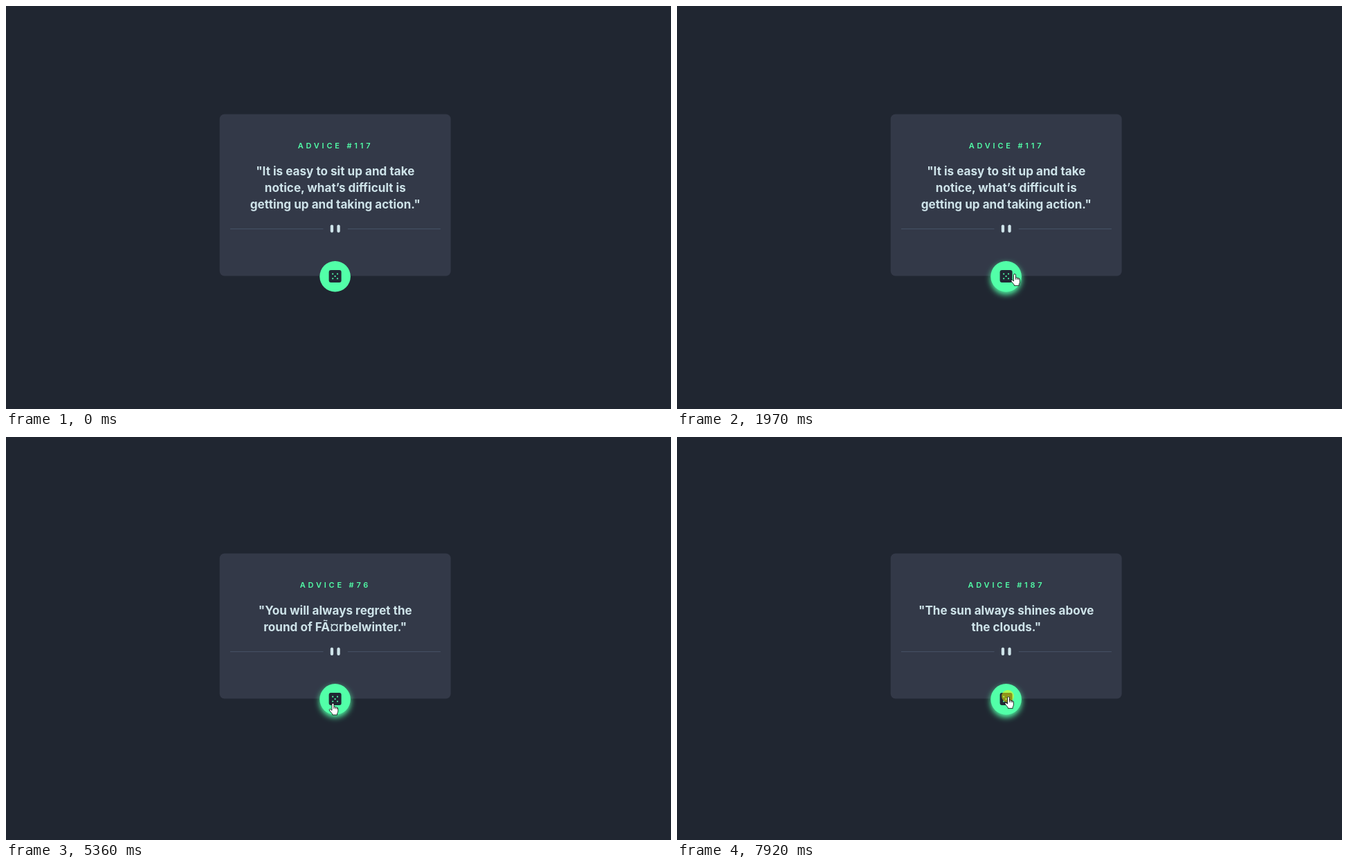
Recreate the animation shown at these times as an HTML page. Size 961 px wide and 583 px high, loop 8 s.

```html
<!DOCTYPE html>
<html lang="en">
<head>
<meta charset="utf-8">
<title>Advice card</title>
<style>
  html, body { margin: 0; width: 100%; height: 100%; overflow: hidden; background: #202631; }
  svg { display: block; width: 961px; height: 583px; }
  text { font-family: Inter, sans-serif; text-anchor: middle; }
  #title { font-size: 11px; font-weight: 600; letter-spacing: 3.8px; fill: #52ffa8; }
  .quote { font-size: 17.1px; font-weight: 680; fill: #cee3e9; }
</style>
</head>
<body>
<svg viewBox="0 0 961 583">
  <defs>
    <filter id="blur" x="-50%" y="-50%" width="200%" height="200%"><feGaussianBlur stdDeviation="4"/></filter>
  </defs>
  <rect width="961" height="583" fill="#202631"/>
  <rect id="card" x="308.7" width="334" rx="7" fill="#333948"/>
  <text id="title" x="476"/>
  <text class="quote" x="475.8"/>
  <text class="quote" x="475.8"/>
  <text class="quote" x="475.8"/>
  <g id="divider">
    <path d="M324 .4H458.5M493.8 .4H628" stroke="#4f5d74" stroke-width=".7"/>
    <g fill="#cee3e9">
      <rect x="468.8" y="-5.6" width="4.3" height="11.4" rx="2.1"/>
      <rect x="478.4" y="-5.6" width="4.3" height="11.4" rx="2.1"/>
    </g>
  </g>
  <g id="button">
    <circle id="glow" cy="3.7" r="22.3" fill="#52ffa8" filter="url(#blur)"/>
    <circle r="22.3" fill="#52ffa8"/>
    <rect x="-9" y="-9.3" width="18" height="18" rx="3" fill="#202733"/>
    <g id="pips" fill="#52ffa8"></g>
  </g>
  <g id="cursor">
    <circle id="click" r="9" fill="#ff0"/>
    <path id="arrow" d="M.5.5V14.5L3.7 11.5 5.8 16.3 8 15.3 5.9 10.7H10.2Z" fill="#fff" stroke="#000" stroke-width=".9"/>
    <g id="hand" stroke="#000" stroke-width=".8" stroke-linejoin="round">
      <path fill="#fff" d="M-.5 2.2a1.5 1.5 0 0 1 3 0V6q1.6-.7 2.3.5 1.5-.5 2.1.6 1.4-.2 1.5 1.4V12q0 2-1.2 3.6V17.6H.3V16.3L-3.5 11.8Q-4.8 9.8-3.5 9.2-2.3 8.9-.5 11Z"/>
      <path fill="none" d="M2.5 6v2.8M4.8 6.5v2.5M6.9 7.1v2.2"/>
    </g>
  </g>
</svg>
<script>
const LOOP = 8000;
const $ = id => document.getElementById(id);
const quoteLines = [...document.querySelectorAll('.quote')];

const slips = [
  { at: 0, id: 117, lines: ['"It is easy to sit up and take', 'notice, what’s difficult is', 'getting up and taking action."'] },
  { at: 2830, id: 76, lines: ['"You will always regret the', 'round of FÃ¤rbelwinter."'] },
  { at: 6660, id: 187, lines: ['"The sun always shines above', 'the clouds."'] },
];

// The pointer advances in discrete steps; power > 1 eases out.
const moves = [
  { start: 530, end: 1090, steps: 9, from: [915, 588], to: [547, 396], power: 1.6 },
  { start: 1240, end: 1420, steps: 4, from: [547, 396], to: [466, 387], power: 2 },
  { start: 1700, end: 1970, steps: 3, from: [466, 387], to: [487, 387], power: 1 },
  { start: 3160, end: 3400, steps: 4, from: [487, 387], to: [470, 386], power: 1.5 },
  { start: 5360, end: 5840, steps: 7, from: [470, 386], to: [480, 375], power: 1 },
  { start: 6040, end: 6040, steps: 1, from: [480, 375], to: [478, 375], power: 1 },
];
const clicks = [1640, 3240, 6040, 7920];
const CLICK_FADE = 330;
const HOVER_AT = 1300;

for (const [x, y] of [[-1, -1], [1, -1], [0, 0], [-1, 1], [1, 1]]) {
  const pip = document.createElementNS('http://www.w3.org/2000/svg', 'circle');
  pip.setAttribute('cx', x * 3.4);
  pip.setAttribute('cy', y * 3.4 - .3);
  pip.setAttribute('r', 1.1);
  $('pips').append(pip);
}

const place = (el, x, y) => el.setAttribute('transform', `translate(${x} ${y})`);
const latest = (list, t, key) => list.filter(item => item[key] <= t).pop();

function pointerAt(t) {
  const move = latest(moves, t, 'start');
  if (!move) return null;
  const { start, end, steps, from, to, power } = move;
  const step = t >= end ? steps : Math.floor((t - start) / (end - start) * (steps - 1)) + 1;
  const eased = 1 - (1 - step / steps) ** power;
  return from.map((v, i) => v + (to[i] - v) * eased);
}

function drawCard(t) {
  const { id, lines } = latest(slips, t, 'at');
  const height = 162.8 + lines.length * 23.7;
  const top = 273.5 - height / 2;
  const bottom = top + height;
  $('card').setAttribute('y', top);
  $('card').setAttribute('height', height);
  $('title').setAttribute('y', top + 49.3);
  $('title').textContent = `ADVICE #${id}`;
  quoteLines.forEach((el, i) => {
    el.setAttribute('y', top + 88.7 + i * 23.7);
    el.textContent = lines[i] || '';
  });
  place($('divider'), 0, bottom - 68.4);
  place($('button'), 475.6, bottom + .8);
}

function drawPointer(t) {
  const pos = pointerAt(t);
  const hovering = t >= HOVER_AT;
  $('glow').style.opacity = hovering ? Math.min(1, .4 + (t - HOVER_AT) / 110) : 0;
  $('cursor').style.display = pos ? '' : 'none';
  if (!pos) return;
  place($('cursor'), ...pos);
  $('arrow').style.display = hovering ? 'none' : '';
  $('hand').style.display = hovering ? '' : 'none';
  const pressed = clicks.filter(c => c <= t).pop() ?? -LOOP;
  const age = t - pressed;
  $('click').style.opacity = age < 100 ? .5 : Math.max(0, .5 * (CLICK_FADE - age) / (CLICK_FADE - 100));
}

function render(t) {
  drawCard(t);
  drawPointer(t);
}

const begin = performance.now();
function tick() {
  render((performance.now() - begin) % LOOP);
  requestAnimationFrame(tick);
}
tick();
</script>
</body>
</html>
```
